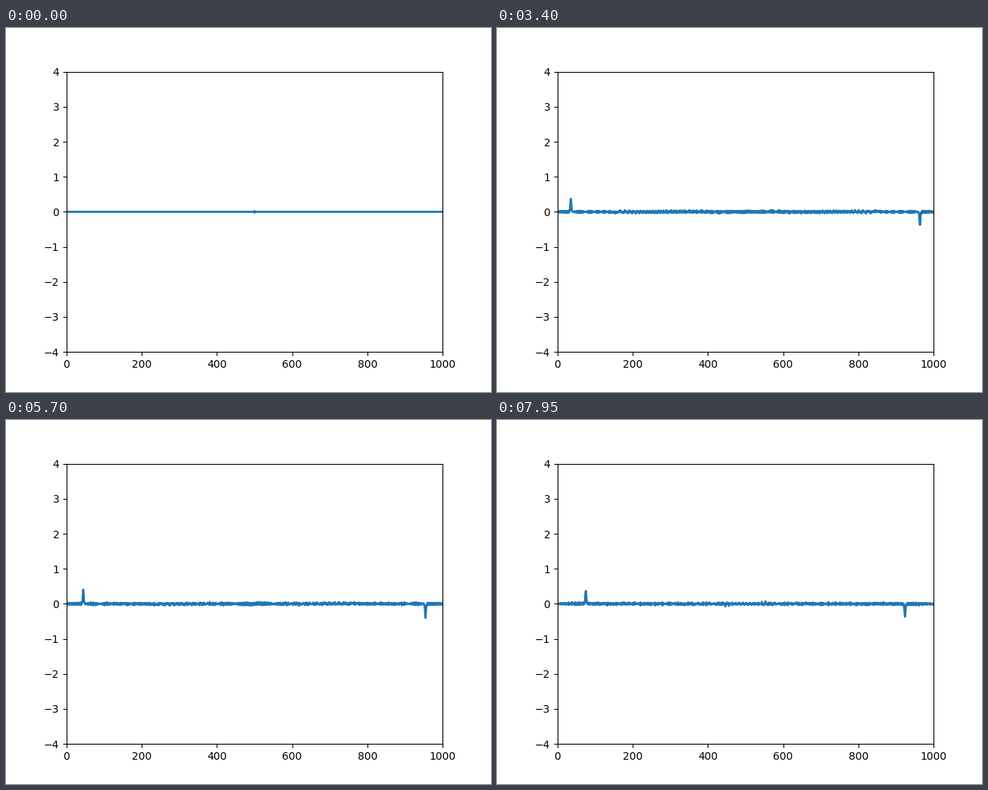
A matplotlib script for the animation above (8000 ms loop, 640x480 px).

```python
import numpy as np
import matplotlib.pyplot as plt
from matplotlib.animation import FuncAnimation

SITES = 1000
FRAMES = 160
INTERVAL = 50       # ms
DT = 0.05
STEPS = 400         # integration steps per frame
SCALE = 0.824       # strain scale of the exponential springs
KAPPA = 0.67        # inverse width of the emitted solitons


def evolve(strain, vel, dt, steps):
    """Leapfrog a periodic chain of exponential springs, in place."""
    force = np.empty(SITES)
    for _ in range(steps):
        np.divide(strain, SCALE, out=force)
        np.expm1(force, out=force)
        force *= SCALE * dt
        vel += force
        vel[1:] -= force[:-1]
        vel[0] -= force[-1]
        strain[:-1] += dt * (vel[1:] - vel[:-1])
        strain[-1] += dt * (vel[0] - vel[-1])


def simulate():
    """Release one stretched spring in the middle and record velocities."""
    strain = np.zeros(SITES)
    vel = np.zeros(SITES)
    strain[SITES // 2 - 1] = 2 * KAPPA * SCALE
    evolve(strain, vel, 0.01, 1)
    history = [vel.copy()]
    for _ in range(FRAMES - 1):
        evolve(strain, vel, DT, STEPS)
        history.append(vel.copy())
    return history


history = simulate()

fig, ax = plt.subplots(figsize=(6.4, 4.8), dpi=100)
ax.set_xlim(0, 1000)
ax.set_ylim(-4, 4)
line, = ax.plot(np.arange(SITES), history[0], lw=2)


def update(i):
    line.set_ydata(history[i])
    return line,


anim = FuncAnimation(fig, update, frames=FRAMES, interval=INTERVAL,
                     repeat=True, repeat_delay=0)
plt.show()
```
